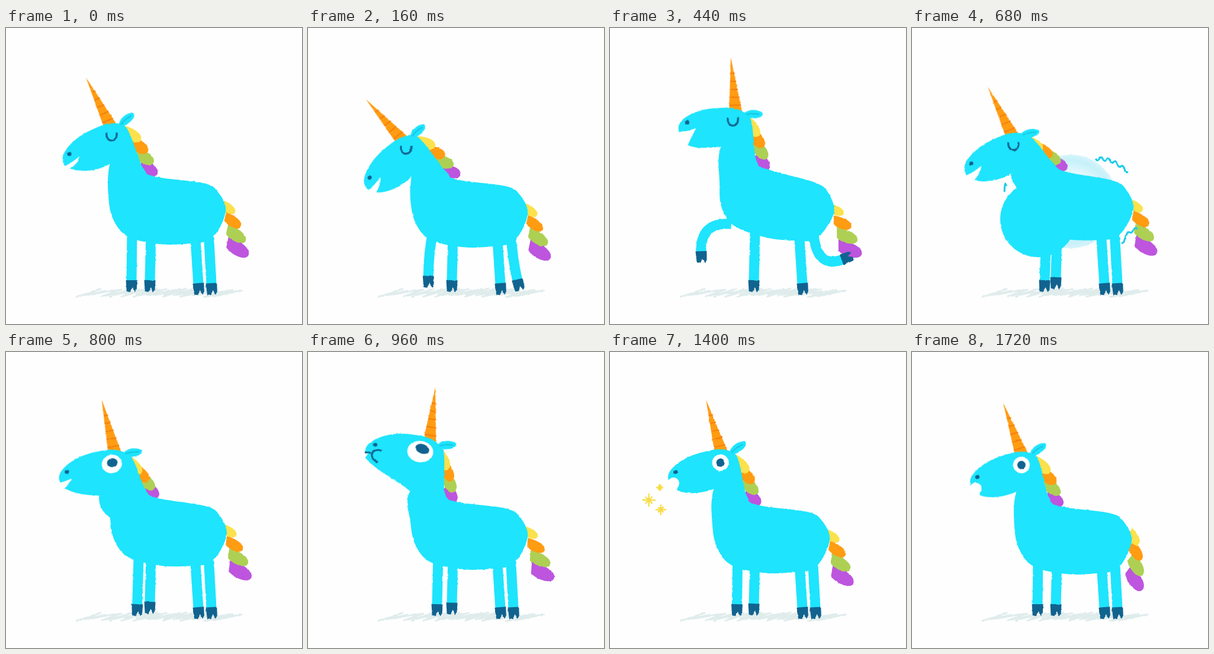
Write an HTML page that moves like this. It is 500x500 px and loops after 1.76 s.

```html
<!DOCTYPE html>
<html lang="en">
<head>
<meta charset="utf-8">
<title>Unicorn burp</title>
<style>
  html, body { margin: 0; width: 100%; height: 100%; overflow: hidden; background: #fefefe; }
  svg { display: block; width: 100%; height: 100%; }
</style>
</head>
<body>
<svg viewBox="0 0 500 500">
  <defs>
    <filter id="crayon" filterUnits="userSpaceOnUse" x="0" y="0" width="500" height="500" color-interpolation-filters="sRGB">
      <feTurbulence type="fractalNoise" baseFrequency=".2" numOctaves="2" seed="4"/>
      <feDisplacementMap in="SourceGraphic" scale="2.6" xChannelSelector="R" yChannelSelector="G"/>
    </filter>
    <radialGradient id="puff">
      <stop offset=".6" stop-color="#e6f9fd"/>
      <stop offset=".88" stop-color="#c6f0f9"/>
      <stop offset="1" stop-color="#d6f4fb"/>
    </radialGradient>
  </defs>
  <g filter="url(#crayon)">
    <path id="shadow" fill="none" stroke="#e0ecec" stroke-width="2.6"/>
    <g id="stage"></g>
  </g>
</svg>
<script>
const LOOP = 1760, STEP = 40;
const BLUE = '#1ee4fd', DARK = '#11638f', ORANGE = '#ff9c12';
const HAIR = ['#fbe14c', ORANGE, '#add054', '#bd55de'];
const stage = document.getElementById('stage');

// Each pose keeps what it does not change from the pose before
const poses = [];
const pose = (t, change) => poses.push({ ...poses[poses.length - 1], ...change, t });

pose(0, {
  x: 175, y: 163, tilt: -26, ear: -9, open: 0, cheek: 0, round: 0,
  sink: 0, lean: 0, lift: 0, gather: 0, tail: 77
});
pose(160, { x: 157, y: 187, tilt: -41, ear: 5, open: .25, sink: 5, lift: .15 });
pose(440, { x: 212, y: 138, tilt: -4.5, ear: 9, open: 1, sink: 0, lean: 8, lift: 1, tail: 71 });
pose(680, { x: 168, y: 179, tilt: -26, ear: 20, open: .35, sink: -4, lean: 3, lift: 0, gather: 1, tail: 76 });
pose(960, { x: 206, y: 148, tilt: 6.5, ear: -5, cheek: 1, sink: 2, lean: 0, gather: .5, tail: 73 });
pose(1100, { y: 144 });
pose(1200, { x: 180, y: 171, tilt: -22, ear: -16, open: .5, cheek: 0, round: 11, sink: 6 });
pose(1400, { x: 187, y: 166, tilt: -15.6, ear: -14, round: 10, sink: 8, gather: .2, tail: 76 });
pose(1720, { x: 184, y: 170, tilt: -19, ear: -12, sink: 10, gather: 0, tail: 89 });
poses.push({ ...poses[0], t: LOOP });

// Swallowed air: swells in the belly, climbs to the cheeks
const air = [
  { t: 500, x: 268, y: 300, r: 40 },
  { t: 600, x: 268, y: 293, r: 79 },
  { t: 680, x: 213, y: 323, r: 64 },
  { t: 780, x: 198, y: 250, r: 40 },
  { t: 920, x: 155, y: 185, r: 15 }
];

const clamp = v => Math.max(0, Math.min(1, v));
const lerp = (a, b, u) => a + (b - a) * u;
const mid = (a, b, u) => [lerp(a[0], b[0], u), lerp(a[1], b[1], u)];
const fix = v => +v.toFixed(2);

function tween(keys, t) {
  const i = keys.findIndex(k => k.t > t);
  if (i < 1) return null;
  const a = keys[i - 1], b = keys[i];
  const x = (t - a.t) / (b.t - a.t), u = x * x * (3 - 2 * x);
  const now = {};
  for (const k in a) now[k] = lerp(a[k], b[k], u);
  return now;
}

function spin([x, y], deg, [ox, oy]) {
  const a = deg * Math.PI / 180, c = Math.cos(a), s = Math.sin(a);
  return [ox + c * x - s * y, oy + s * x + c * y];
}

const path = (d, fill, extra = '') => `<path d="${d}" fill="${fill}" ${extra}/>`;
const line = (d, color, w) =>
  path(d, 'none', `stroke="${color}" stroke-width="${w}" stroke-linejoin="round"`);
const place = (x, y, rot, inner) =>
  `<g transform="translate(${fix(x)} ${fix(y)}) rotate(${fix(rot)})">${inner}</g>`;
const oval = (x, y, rx, ry, fill, rot = 0) =>
  place(x, y, rot, `<ellipse rx="${fix(rx)}" ry="${fix(ry)}" fill="${fill}"/>`);

// Smooth closed curve through points
function blob(pts) {
  const n = pts.length, at = i => pts[(i + n) % n];
  let d = `M${pts[0].map(fix)}`;
  pts.forEach((b, i) => {
    const a = at(i - 1), c = at(i + 1), e = at(i + 2);
    const h1 = b.map((v, k) => fix(v + (c[k] - a[k]) / 6));
    const h2 = c.map((v, k) => fix(v - (e[k] - b[k]) / 6));
    d += `C${h1} ${h2} ${c.map(fix)}`;
  });
  return d + 'Z';
}

// Four locks strung from a to b, each growing by grow, the lowest at the back
function locks(a, b, rot, l, w, grow) {
  return HAIR.map((color, i) => {
    const f = i / 3, L = l + grow * 2 * f, W = w + grow * f;
    const [x, y] = mid(a, b, f);
    return place(x + 3 * Math.sin(f * Math.PI), y, rot, path(
      `M${-L},${-W}C0,${-W * 1.1} ${L},${-W * .7} ${L},${W * .2}` +
      `C${L},${W * 1.2} ${-L * .3},${W * 1.1} ${-L * .8},${W * .5}Z`, color));
  }).reverse().join('');
}

function leg(hip, knee, ankle) {
  const turn = Math.atan2(ankle[1] - knee[1], ankle[0] - knee[0]) * 180 / Math.PI - 90;
  return line(`M${hip.map(fix)}Q${knee.map(fix)} ${ankle.map(fix)}`, BLUE, 17) +
    place(...ankle, turn, path('M-9.5,-2L9.5,-2L9,13L6,18L2,10L-2,18L-8,17Z', DARK));
}

function legs({ lift, gather }) {
  const straight = (hx, ax, ay) => [[hx, 342], [(hx + ax) / 2, 388], [ax, ay]];
  const bend = (from, to) => from.map((p, i) => mid(p, to[i], lift));
  return [
    bend(straight(213 + 14 * gather, 212 + 12 * gather, 428), [[205, 331], [152, 327], [154, 379]]),
    straight(245, 243, 428 - 5 * gather),
    straight(319, 325, 433),
    bend(straight(342, 347, 433), [[344, 350], [350, 407], [393, 391]])
  ].map(l => leg(...l)).join('');
}

function horn() {
  let bands = '';
  for (let i = 0; i < 5; i++) {
    const y = -8 - 13.5 * i, w = 11 * (1 + y / 90);
    bands += `M${fix(-w)},${y}L${fix(w)},${y + 1}`;
  }
  return path('M-11,2L-1,-89L11,6Z', ORANGE) + line(bands, '#f47c0c', 1.8);
}

function eye(t, tilt, c) {
  if (t < 760) return place(-6, 20, -tilt, line('M-8.5,-7C-11,11 11,11 8.5,-7', DARK, 3.2));
  return oval(-6 - 8 * c, 20 + 2 * c, 14 + 8 * c, 14 + 4 * c, '#fff') +
    oval(-6 - 5 * c, 20 - 3 * c, 7 + 5 * c, 7 + c, DARK, 14 * c);
}

function head(t, { x, y, tilt, ear, open, cheek: c, round: o }, throat) {
  const jaw = 37 + 16 * open, jx = -93 + 8 * open - 15 * c;
  const skull = [
    'M22,14C14,0 -5,-5 -26,-5',
    `C-60,-7 ${-80 - 5 * c},${2 + c} ${-91 - 8 * c},${10 + 6 * c}`,
    `C${-97 - 8 * c},${15 + 6 * c} ${-100 - 8 * c},${22 + 6 * c} ${-98 - 8 * c},${30 + 4 * c}`,
    `Q${-85 - 16 * c},${30 + 4 * c} ${-69 - 31 * c - 1.8 * o},${26 + 8 * c}`,
    `Q${-75 - 27 * c - o},${36 + c} ${jx},${jaw}`,
    `C${-78 - 6 * c},${jaw * .4 + 38 + 8 * c} -52,${62 + 10 * c} ${throat}L18,30Z`
  ].join('');
  let s = horn() + path(skull, BLUE);
  if (o > 1) s += oval(-92, 32.5, o, o, '#fff');
  s += oval(-83 - 8 * c, 15 + 4 * c, 3.7, 3.2, DARK) + eye(t, tilt, c);
  if (c > .6) s += line('M-107,34L-95,33Q-88,25 -79,28M-95,33Q-95,45 -83,48', DARK, 3);
  s += place(14, 8, ear,
    path('M-3,2C4,-8 20,-11 31,-4C33,4 22,8 0,6Z', BLUE) + line('M3,1Q14,-3 26,-1', '#16bfdd', 1.8));
  return place(x, y, tilt, s);
}

// Torso outline at rest, from the withers round to the breast
const TORSO = [
  [252, 251], [333, 262], [358, 277], [371, 310], [348, 355],
  [310, 364], [260, 365], [207, 353], [182, 325], [173, 285]
];

function trail(t) {
  const k = clamp(1.2 - Math.abs(t - 680) / 90);
  return k && `<circle cx="268" cy="293" r="79" fill="url(#puff)" opacity="${fix(k)}"/>`;
}

// Wavy stroke between two points
function wave(a, b, turns) {
  let d = '';
  for (let i = 0; i <= turns * 6; i++) {
    const u = i / (turns * 6), [x, y] = mid(a, b, u);
    d += `${i ? 'L' : 'M'}${fix(x)},${fix(y + 3 * Math.sin(u * turns * 2 * Math.PI) - 7 * Math.sin(u * Math.PI))}`;
  }
  return d;
}

function wobble(t) {
  if (t < 640 || t > 740) return '';
  return line(wave([310, 221], [365, 243], 4.5) + wave([354, 364], [381, 340], 2) +
    wave([160, 265], [156, 276], 1), '#1bcbea', 3);
}

function stars(t) {
  const u = (t - 1180) / 520;
  if (u <= 0 || u >= 1) return '';
  const far = 1.25 * (1 - (1 - u) ** 3);
  const size = clamp(u * 5) * clamp((1 - u) * 2);
  return [[66, 250, 11], [84, 229, 6], [86, 266, 9]].map(([x, y, r]) => {
    let d = '';
    for (let i = 0; i < 4; i++) {
      const [dx, dy] = spin([r * size * (i % 2 ? .75 : 1), 0], i * 45, [0, 0]).map(fix);
      d += `M${-dx},${-dy}L${dx},${dy}`;
    }
    return place(lerp(104, x, far), lerp(226, y, far), 0, line(d, '#f7dc45', 2.4));
  }).join('');
}

function draw(t) {
  const p = tween(poses, t), lump = tween(air, t);
  const onHead = pt => spin(pt, p.tilt, [p.x, p.y]);
  const throat = [-29 + 5 * p.cheek, 60 + 30 * p.cheek];
  const torso = TORSO.map(([x, y]) => spin([x - 345, y - 360], p.lean, [345, 360 + p.sink]));
  const [wx, wy] = torso[0], [rx, ry] = torso[3];
  const root = [rx + 4, ry - 6];
  const tip = spin([70, 0], p.tail, root);

  stage.innerHTML = (trail(t) || '') +
    locks(root, tip, 25 + (p.tail - 77) * 2, 14, 8.5, 4) +
    locks(onHead([26, 33]), [wx - 11, wy - 13], 46 + p.tilt, 17, 11, 0) +
    legs(p) +
    path(blob([onHead([21, 13]), [wx - 21, wy - 16], ...torso, onHead(throat)]), BLUE) +
    (lump ? oval(lump.x, lump.y, lump.r, lump.r, BLUE) : '') +
    head(t, p, throat) + wobble(t) + stars(t);
}

function scribble() {
  let seed = 7, d = '';
  const rnd = () => (seed = seed * 16807 % 2147483647) / 2147483647;
  for (let x = 142; x < 382; x += 7) {
    const left = [x - 24 + rnd() * 8, 448 + rnd() * 7];
    const right = [x + 14 + rnd() * 18, 439 + rnd() * 6];
    d += `${d ? 'L' : 'M'}${left.map(fix)}L${right.map(fix)}`;
  }
  document.getElementById('shadow').setAttribute('d', d);
}

let shown = -1;
function tick() {
  const t = Math.floor(performance.now() % LOOP / STEP) * STEP;
  if (t !== shown) draw(shown = t);
  requestAnimationFrame(tick);
}

scribble();
draw(0);
requestAnimationFrame(tick);
</script>
</body>
</html>
```
